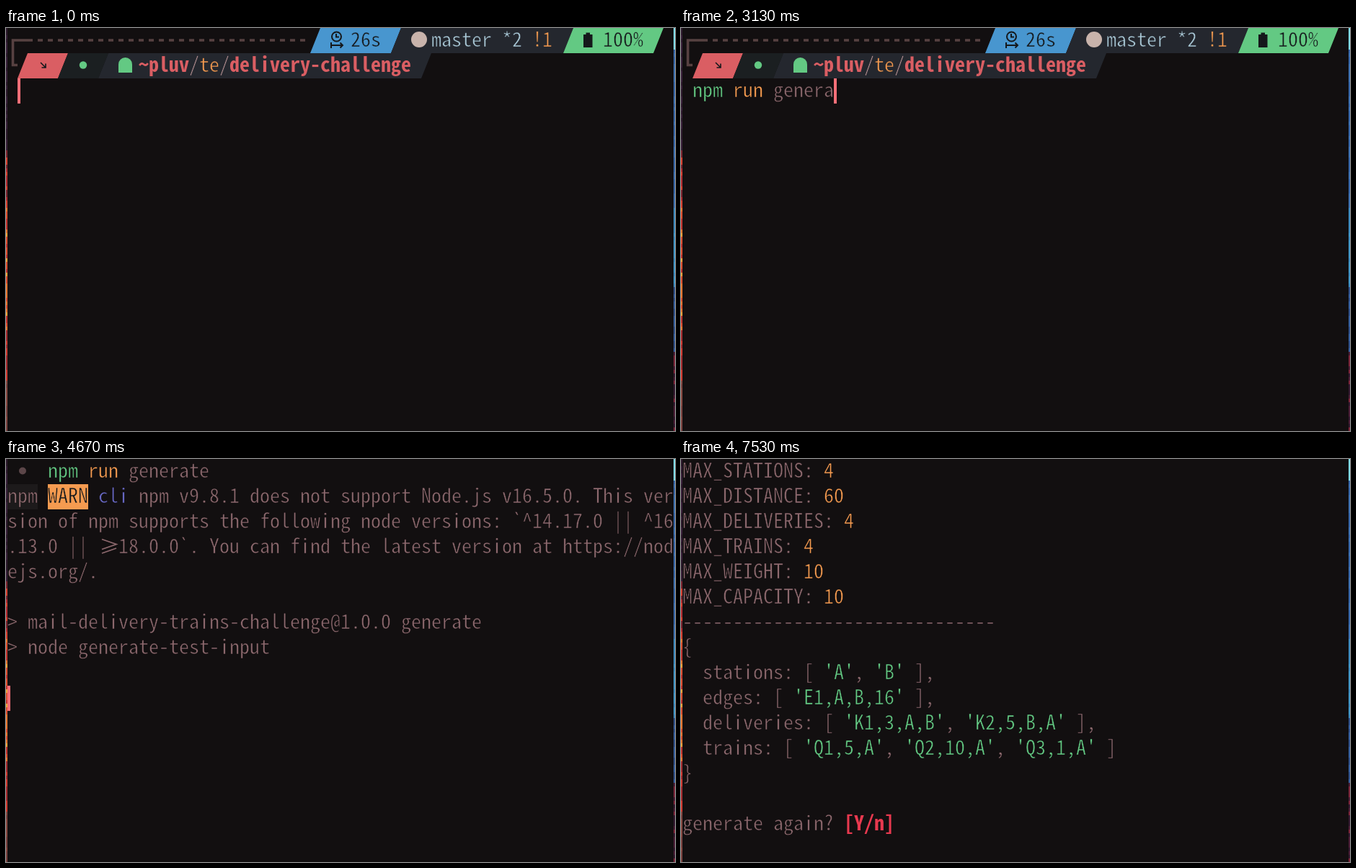
An HTML page that plays this animation: 928x560 px, repeating every 8 s.

```html
<!DOCTYPE html>
<html lang="en">
<head>
<meta charset="utf-8">
<title>Terminal session</title>
<style>
  html, body { margin: 0; width: 100%; height: 100%; overflow: hidden; background: #120f10; }
  svg { display: block; }
  /* An outline in the background colour gives the type a light weight. */
  text {
    font-family: "Noto Sans Mono CJK SC", "Noto Sans Mono CJK JP", "Noto Sans Mono CJK KR", "Noto Sans Mono", monospace;
    font-kerning: none;
    font-variant-ligatures: none;
    white-space: pre;
    stroke: var(--back, #120f10);
    stroke-width: 0.6px;
  }
</style>
</head>
<body>
<svg id="stage" width="928" height="560" viewBox="0 0 928 560"></svg>
<script>
const LOOP = 8000, CELL = 14, ROW = 35, LEFT = 2, BASELINE = 26;
const C = {
  back: '#120f10', dim: '#8d696e', green: '#63c983', orange: '#f59b50', red: '#da5e63',
  blue: '#4896cf', slate: '#24272e', deep: '#1b1f21', ink: '#15181b', pale: '#a9c8d6',
  frame: '#574141', cursor: '#f66f78', alert: '#e8394f'
};
const stage = document.getElementById('stage');
const colX = col => LEFT + col * CELL;

// One terminal row made of [text, colour, bold] runs on the character grid.
function line(row, col, ...runs) {
  const spans = runs.map(([text, color = C.dim, bold]) => {
    const weight = bold ? 'font-weight="700" stroke="none"' : '';
    const span = `<tspan x="${colX(col)}" fill="${color}" ${weight}>${text}</tspan>`;
    col += text.length;
    return span;
  });
  return `<text y="${row * ROW + BASELINE}">${spans.join('')}</text>`;
}

const on = (back, body) => `<g style="--back:${back}">${body}</g>`;
const rect = (x, y, w, h, fill) => `<rect x="${x}" y="${y}" width="${w}" height="${h}" fill="${fill}"/>`;

// Slanted status-bar segment; x positions are those of its top edge.
function segment(row, x1, x2, fill) {
  const y = row * ROW;
  return `<path d="M${x1} ${y}H${x2}L${x2 - 14} ${y + ROW}H${x1 - 14}Z" fill="${fill}"/>`;
}

function prompt() {
  let dashes = '';
  for (let col = 2; col < 30; col++) dashes += `M${colX(col)} 17h7`;
  return `
    <path d="M16 51.5H9.5V17H31${dashes}" fill="none" stroke="${C.frame}" stroke-width="3.6"/>
    ${segment(0, 436, 548, C.blue)}${segment(0, 548, 787, C.slate)}${segment(0, 787, 912, C.green)}
    ${segment(1, 30, 86, C.red)}${segment(1, 86, 142, C.deep)}${segment(1, 142, 590, C.slate)}
    <g fill="none" stroke="${C.ink}" stroke-width="2">
      <circle cx="458.5" cy="12" r="6.5"/>
      <path d="M458 8V12.5H462M451 20V28M451 24H466M463.5 20.5L467 24L463.5 27.5"/>
      <path d="M48 48L55 55M55 49.5V55H49.5" stroke-width="1.6"/>
    </g>
    <path d="M801 9h3.5v-2.5h5.5V9h3.5V27H801Z" fill="${C.ink}"/>
    <circle cx="573" cy="16" r="11" fill="#c8b3ab"/>
    <circle cx="107" cy="51.5" r="5.2" fill="${C.green}"/>
    <path d="M156 62V50.5a9.5 9.5 0 0 1 19 0V62Z" fill="${C.green}"/>
    ${on(C.blue, line(0, 34, ['26s', C.ink]))}
    ${on(C.green, line(0, 59, ['100%', C.ink]))}
    ${on(C.slate, line(0, 42, ['master *2 ', C.pale], ['!1', C.orange])
      + line(1, 13, ['~pluv', C.red, true], ['/', '#b08d8f'], ['te', C.orange], ['/', '#b08d8f'],
        ['delivery-challenge', C.red, true]))}`;
}

const launched = `<circle cx="23" cy="16.5" r="5" fill="#5c4649"/>`
  + line(0, 4, ['npm ', C.green], ['run ', C.orange], ['generate']);

const warning = rect(2, 35, 42, ROW, '#1d1a1b') + rect(58, 35, 56, ROW, C.orange)
  + line(1, 0, ['npm'])
  + on(C.orange, line(1, 4, ['WARN', C.ink]))
  + line(1, 9, ['cli', '#6868c4'], [' npm v9.8.1 does not support Node.js v16.5.0. This ver'])
  + line(2, 0, ['sion of npm supports the following node versions: `^14.17.0 || ^16'])
  + line(3, 0, ['.13.0 ||   18.0.0`. You can find the latest version at https://nod'])
  + `<path d="M133 111.5L153 118.5L133 125.5M133 131L153 124" fill="none" stroke="${C.dim}" stroke-width="1.8"/>`
  + line(4, 0, ['ejs.org/.']);

const script = line(6, 0, ['> mail-delivery-trains-challenge@1.0.0 generate'])
  + line(7, 0, ['> node generate-test-input']);

// A record row: its quoted strings are green.
function record(row, text) {
  const runs = text.split(/('[^']*')/).filter(Boolean)
    .map(part => [part, part[0] === "'" ? C.green : C.dim]);
  return line(row, 0, ...runs);
}

function result() {
  const limits = { STATIONS: 4, DISTANCE: 60, DELIVERIES: 4, TRAINS: 4, WEIGHT: 10, CAPACITY: 10 };
  const records = [
    '{',
    "  stations: [ 'A', 'B' ],",
    "  edges: [ 'E1,A,B,16' ],",
    "  deliveries: [ 'K1,3,A,B', 'K2,5,B,A' ],",
    "  trains: [ 'Q1,5,A', 'Q2,10,A', 'Q3,1,A' ]",
    '}'
  ];
  return Object.entries(limits)
    .map(([name, value], i) => line(i, 0, [`MAX_${name}: `], [String(value), C.orange])).join('')
    + line(6, 0, ['-'.repeat(31)])
    + records.map((text, i) => record(7 + i, text)).join('')
    + line(14, 0, ['generate again? '], ['[Y/n]', C.alert, true]);
}

// Slivers of wallpaper beside the window.
function wallpaper() {
  let seed = 7;
  const random = () => (seed = seed * 16807 % 2147483647) / 2147483647;
  const pick = colors => colors[Math.floor(random() * colors.length)];
  let bars = '';
  for (let y = 0; y < 560; y += 5) {
    const left = y < 170 ? ['#2c1a2d', '#38203a']
      : y < 250 ? ['#b52c31', '#7d2530', '#d8402f']
      : y < 420 ? ['#e0502f', '#eda53a', '#c5352f', '#e7772f']
      : y < 490 ? ['#d23a30', '#a82c30'] : ['#7d4440', '#8a4a42'];
    const right = y < 30 ? ['#7fdbe6']
      : y < 250 ? ['#3565a8', '#3c70b0']
      : y < 360 ? ['#3b8abf', '#4096c6']
      : y < 447 ? ['#345d9c', '#2e4f88'] : ['#4a1c35', '#7a2438', '#33182f'];
    bars += rect(0, y, 2, 5, pick(left)) + rect(926, y, 2, 5, pick(right));
  }
  return bars;
}

const parts = {
  prompt: prompt() + '<g id="input"></g>', launched, warning, script, result: result()
};
stage.innerHTML = rect(0, 0, 928, 560, C.back) + wallpaper()
  + Object.entries(parts).map(([id, body]) => `<g id="${id}">${body}</g>`).join('')
  + `<rect id="cursor" width="4" height="${ROW}" fill="${C.cursor}"/>`;

const el = Object.fromEntries([...stage.querySelectorAll('[id]')].map(node => [node.id, node]));

// Pick the font size whose advance equals one cell.
const pen = document.createElement('canvas').getContext('2d');
pen.font = '100px ' + getComputedStyle(stage.querySelector('text')).fontFamily;
stage.setAttribute('font-size', 100 * CELL / pen.measureText('0').width);

const COMMAND = 'npm run generate';
const KEYS = [600, 800, 1070, 1270, 1470, 1670, 1930, 2070,
  2330, 2470, 2670, 2800, 3000, 3130, 3270, 3400];
const ENTER = 4400, WARN = 4600, SCRIPT = 4670, RESULT = 4800, BLINK = 7530;

const show = (node, visible) => node.setAttribute('display', visible ? 'inline' : 'none');
let shown = -1;

function typeCommand(count) {
  if (count === shown) return;
  shown = count;
  const typed = COMMAND.slice(0, count);
  el.input.innerHTML = line(2, 1,
    [typed.slice(0, 4), count < 3 ? C.red : C.green],
    [typed.slice(4, 8), C.orange],
    [typed.slice(8)]);
}

function update(t) {
  const typed = KEYS.filter(key => key <= t).length;
  typeCommand(typed);
  const running = t >= ENTER && t < RESULT;
  show(el.prompt, t < ENTER);
  show(el.launched, running);
  show(el.warning, running && t >= WARN);
  show(el.script, running && t >= SCRIPT);
  show(el.result, t >= RESULT);

  const [row, col] = t < ENTER ? [2, 1 + typed]
    : t < WARN ? [1, 0]
    : t < SCRIPT ? [5, 0]
    : t < RESULT ? [9, 0] : [14, 22];
  el.cursor.setAttribute('x', colX(col));
  el.cursor.setAttribute('y', row * ROW);
  show(el.cursor, t < BLINK);
}

const start = performance.now();
function tick() {
  update((performance.now() - start) % LOOP);
  requestAnimationFrame(tick);
}
tick();
</script>
</body>
</html>
```
